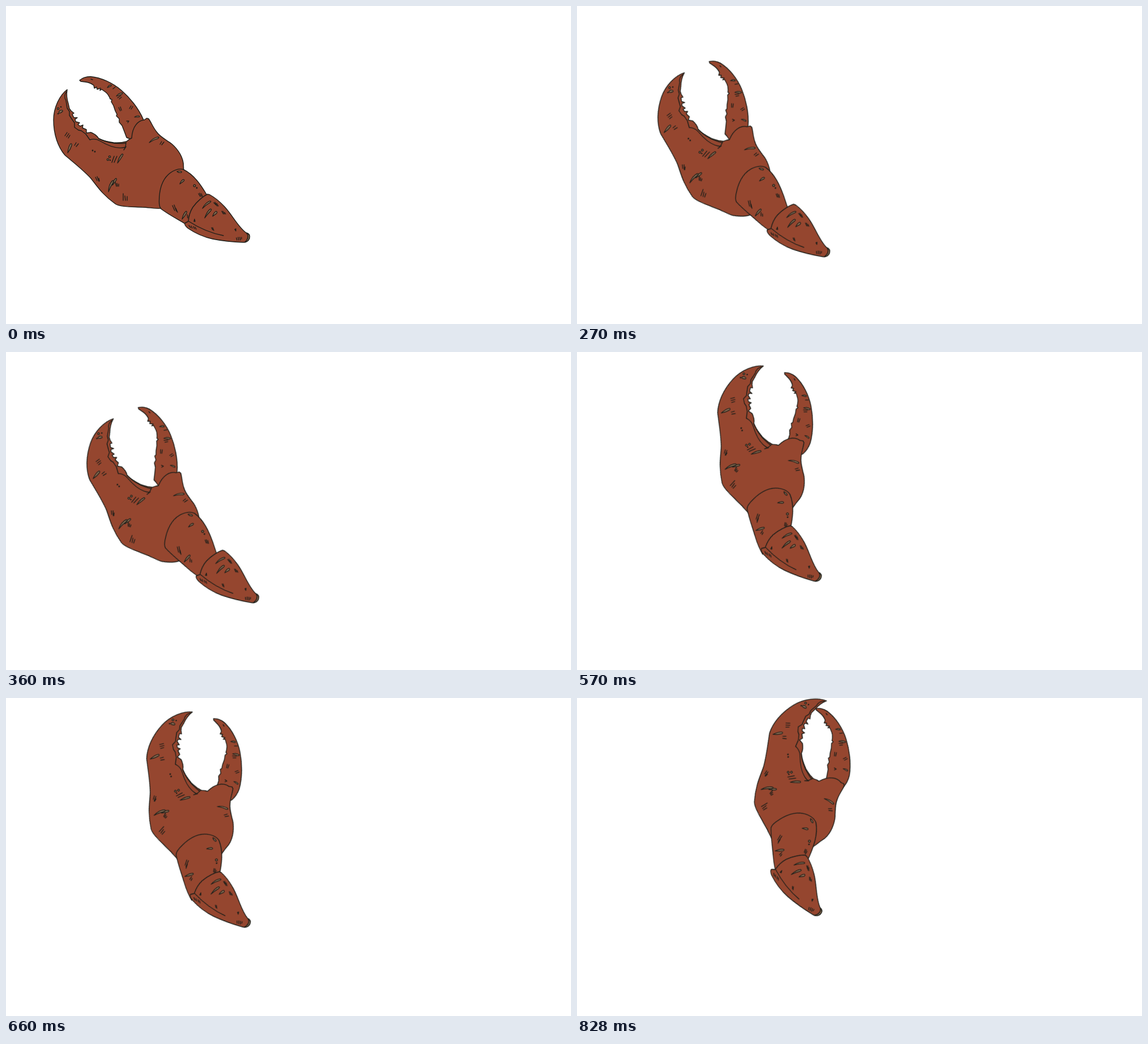
An HTML page for the animation above (900 ms loop, 998 by 561 pixels).

```html
<!DOCTYPE html>
<html lang="en">
<head>
<meta charset="utf-8">
<title>Claw</title>
<style>
  html, body { margin: 0; width: 100%; height: 100%; overflow: hidden; background: #fff; }
  svg { display: block; width: 100vw; height: 100vh; }
  .part {
    fill: #95462f; stroke: #1d1e19; stroke-width: 1.4;
    stroke-linejoin: round; stroke-linecap: round;
    animation: 900ms step-end infinite;
  }
  .line { fill: none; }
  .marks { fill: none; stroke-width: 1.35; }
  .slits { fill: #85694f; stroke-width: 1.2; }
  .cap { fill: #85694f; }

  /* Each part turns about its own middle; poses change in hard steps. */
  #finger { transform-origin: 200px 174.5px; animation-name: finger; }
  #palm { transform-origin: 184px 244.5px; animation-name: palm; }
  #middle { transform-origin: 317.7px 329.5px; animation-name: middle; }
  #base { transform-origin: 371.5px 377.2px; animation-name: base; }

  @keyframes finger {
    0% { transform: none; }
    13.333% { transform: translate(29.2px, -10.2px) rotate(10deg); }
    30% { transform: translate(76px, -6px) rotate(27.1deg); }
    46.667% { transform: translate(110.7px, -48.5px) rotate(23.4deg); }
    63.333% { transform: translate(194.5px, -60.7px) rotate(38.3deg); }
    80%, 100% { transform: translate(258.5px, -82.2px) rotate(31.8deg); }
  }
  @keyframes palm {
    0% { transform: none; }
    13.333% { transform: translate(13px, -5.5px) rotate(11deg); }
    30% { transform: translate(45.5px, -10.2px) rotate(19.2deg); }
    46.667% { transform: translate(73.2px, -68.2px) rotate(25.1deg); }
    63.333% { transform: translate(136px, -97px) rotate(42.4deg); }
    80%, 100% { transform: translate(213.7px, -124px) rotate(58.5deg); }
  }
  @keyframes middle {
    0% { transform: none; }
    13.333% { transform: translate(-15.4px, -5.5px) rotate(-4.2deg); }
    30% { transform: translate(12.3px, -3.5px) rotate(10.7deg); }
    46.667% { transform: translate(22.8px, -32.5px) rotate(25.3deg); }
    63.333% { transform: translate(34.3px, -44.7px) rotate(42deg); }
    80%, 100% { transform: translate(73.8px, -81.8px) rotate(53.8deg); }
  }
  @keyframes base {
    0% { transform: none; }
    13.333% { transform: translate(.2px, 13.3px) rotate(-1.7deg); }
    30% { transform: translate(20.5px, 19.3px) rotate(7.7deg); }
    46.667% { transform: translate(10px, -18.7px) rotate(12deg); }
    63.333% { transform: translate(9.8px, -23.2px) rotate(13.8deg); }
    80%, 100% { transform: translate(23.3px, -52.9px) rotate(29.3deg); }
  }
</style>
</head>
<body>
<svg viewBox="0 0 998 561">
  <g id="finger" class="part">
    <path d="M130 131C136 126 142 124.5 149 124.5C168 126 189 136 204 149C218 161 234 180 242.5 200
      Q246.500 212 244.500 223Q238 238 225 238L218 234L213 232Q209 221 205 211L200 205L200 199L195 194
      L196 191L193 185L190 176L186 169L187 165L184 164Q181 156 176 152L169 147L166 149L167 145L161 147
      L160 143L156 145L155 140Q149 135 140 134L132 133z"/>
    <path class="marks" d="M150 129l3 1M189 146l4-3M197 162l6-4M200 164l4-3M199 179l3 6M202 178l2 6
      M218 181l3-5M221 182l3-5M213 203l4 0l-2 3"/>
    <path class="slits" d="M179 144q2-4 6-5q3 1-1 3zM195 159q3-5 10-6q2 1-1 3zM227 196q4-3 8-2q2 2-1 2z"/>
  </g>

  <g id="palm" class="part">
    <path d="M108 147.500C95 157 84 179 84 201C84 227 92 249 104 263C118 275 135 288 149 303
      C160 316 168 331 193 349C202 355 225 354 240 355C252 355 262 358 272 357
      C290 354 300 349 306 340Q316 320 315 301C315 293 313.500 290 313.500 283
      C314 268 304 253 293 243.500C285 237 273 232 266 222C259 213 257 206 252 199L248.500 198
      Q246 200 244 201C233 202 223 213 222 233
      L218 235L213 239Q202 242 190 241Q174 239 164 234Q160 227 150 223L142 224L142 218L135 215
      L136 210L131 212L127 209L130 206L123 204L122 200L126 197L120 197L117 191L120 189L115 185
      L112 181L110 172Q106 160 108 147.500z"/>
    <path class="line" d="M107 151Q101 158 106 167L108 180L112 186L112 193L118 202L121 206L121 214L128 219L133 220
      L141 226L148 236Q158 233 166 238C181 247 198 253 211 249L212 240M164 234Q187 245 212 242M212 248l-4 6"/>
    <path class="marks" d="M104 229l4-6M107 231l4-6M110 233l3-5M121 246l3-5M124 248l4-5
      M187 276l4-11M191 276l5-11M158 302l3 6M161 301l3 8M164 304l1 5
      M193 311l2 7M196 313l1 5M199 314v4M207 331v12M210 335l1 8M214 336v7M272 244l3-5M275 245l4-5"/>
    <g class="slits">
      <circle cx="92" cy="181" r="1.7"/>
      <circle cx="97" cy="178" r=".7"/>
      <circle cx="92" cy="190" r=".7"/>
      <circle cx="183" cy="266" r="1.7"/>
      <circle cx="180" cy="271" r="1.7"/>
      <circle cx="184" cy="272" r=".6"/>
      <circle cx="153" cy="255" r=".8"/>
      <circle cx="157" cy="257" r=".8"/>
      <path d="M94 189q-2-2 2-5q5-1 4 2q-3 3-6 3M109 259q1-11 5-16q3-1 2 3q-2 7-7 13M197 277q2-10 8-16q3 0 1 3q-4 7-9 13
        M181 328q0-13 7-20q3-1 2 3q-5 6-9 17M188 316q1-8 6-12q2 0 1 3q-3 5-7 9M253 241q6-8 15-10q4 0 0 3q-8 2-15 7"/>
    </g>
  </g>

  <g id="middle" class="part">
    <path d="M313.500 288.500C306 286 296 289 287 297C276 307 270.500 325 270.500 345Q270.500 354 274 358
      C286 367 301 375 316 384Q334 395 348 399L364.500 351Q359 341 354 332C345 317 333 298 313.500 288.500z"/>
    <path class="marks" d="M340 331l3 5M342 330l3 6M345 331l2 5
      M294 352l4 9M297 351l4 11M300 357l3 7M320 368l1 6M323 370l1 4"/>
    <g class="slits">
      <circle cx="333" cy="317" r="1.9"/>
      <circle cx="337" cy="321" r=".8"/>
      <path d="M302 292q4-2 8 0q1 2-2 2q-4 0-6-2M307 314q2-6 6-8q3 0 1 3zM311 376q2-10 7-14q2 0 1 3q-3 6-8 11"/>
    </g>
  </g>

  <g id="base" class="part">
    <path d="M356 332C349 335 337 345 330 355Q323 366 322 380L316 383Q314.500 387 322 392.500
      C336 402 351 408 365 411Q390 416 420 417Q430 415 430.500 407Q430.500 402 424 400
      C410 390 400 369 386 354Q373 340 360 333z"/>
    <path class="cap" d="M425 400.500Q430.500 402 430.500 407Q430 415 422 417Q431 408 425 400.500z"/>
    <path class="line" d="M323 380C340 391 363 401 384 405"/>
    <path class="marks" d="M367 347l4 4M369 346l4 7M372 348l3 5M381 362l3 5M383 362l3 5M386 364l2 3
      M363 391l2 4M365 391l2 5M404 394l2 3v-4zM407 409l1 4M410 408l1 5M413 408l1 5M416 408v3
      M323 387l3 4M327 388l2 4M331 389l2 4M334 390l2 4M332 380l1-4l1 4z"/>
    <path class="slits" d="M347 357q5-10 13-13q4 0 0 3q-7 4-13 10M351 374q4-12 10-16q3 0 1 3q-6 6-11 13
      M365 371q2-7 6-9q3 1 1 4z"/>
  </g>
</svg>
</body>
</html>
```
